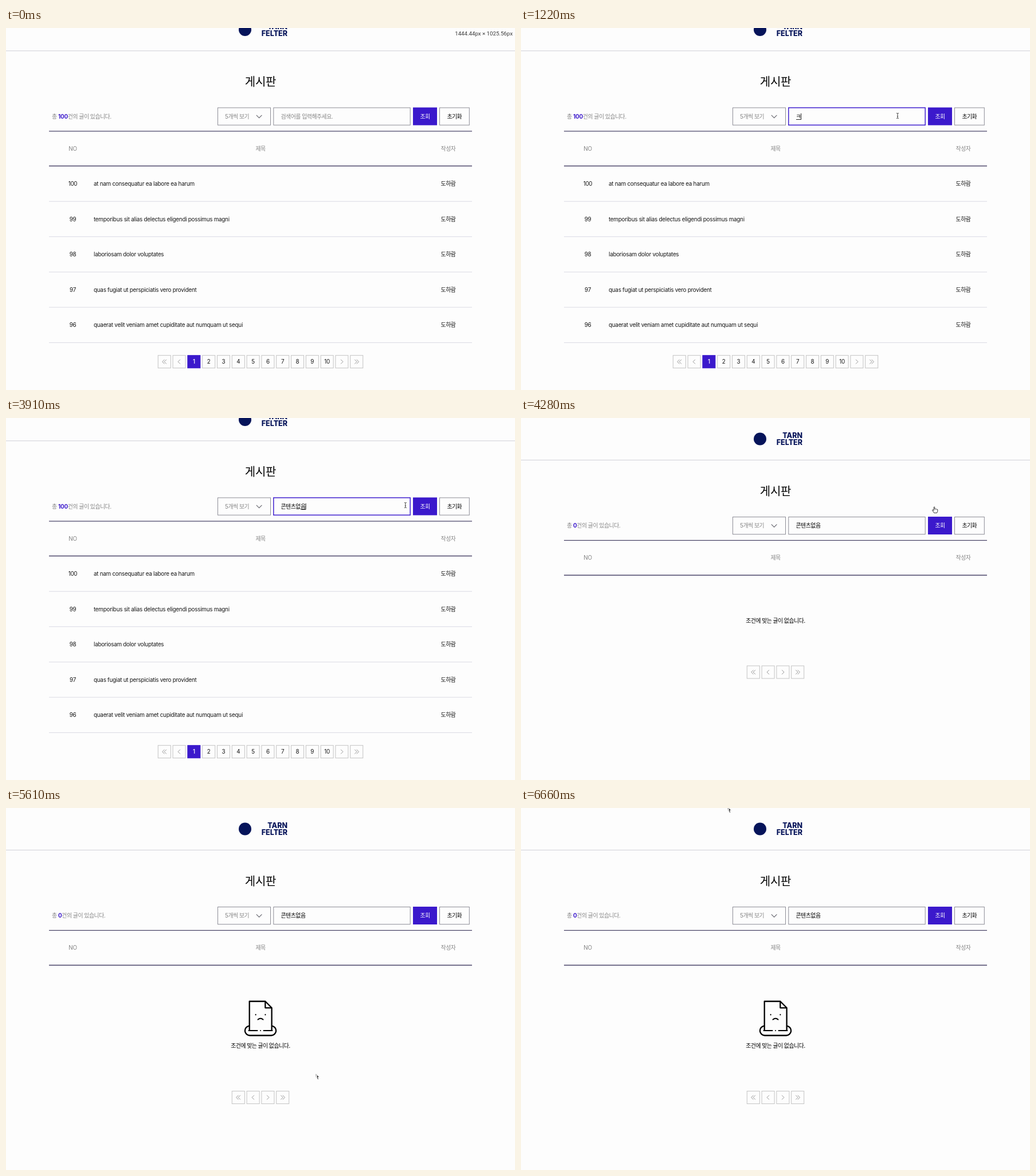
Recreate the animation shown at these times as an HTML page. Size 888x631 px, loop 6.69 s.

```html
<!DOCTYPE html>
<html lang="ko">
<head>
<meta charset="utf-8">
<title>게시판</title>
<style>
  html, body { margin: 0; width: 100%; height: 100%; overflow: hidden; background: #fdfdfd; }
  svg { display: block; width: 888px; height: 631px; }
  text { font: 400 9.85px Inter, "Noto Sans CJK KR", "Noto Sans CJK", sans-serif; letter-spacing: -.25px; fill: #161616; white-space: pre; }
  .ko { letter-spacing: -.46px; }
  .mid { text-anchor: middle; }
  .muted { fill: #858585; }
  .strong { font-weight: 500; fill: #000; }
  .white { fill: #fff; font-weight: 500; }
  .title { font-size: 20px; font-weight: 500; letter-spacing: -.3px; fill: #000; }
  .brand { font-size: 12.5px; font-weight: 800; letter-spacing: 0; text-anchor: end; fill: #06145a; }
  .tip { font: 9.7px Roboto, sans-serif; letter-spacing: 0; text-anchor: end; fill: #3a3a3a; }
  #count { font-weight: 700; fill: #3b19cc; letter-spacing: -.2px; }
</style>
</head>
<body>
<svg viewBox="0 0 888 631">
  <g id="page">
    <circle cx="417" cy="36.5" r="11" fill="#06145a"/>
    <text class="brand" x="491" y="35">TARN</text>
    <text class="brand" x="491" y="47">FELTER</text>
    <path d="M0 73.3H888" stroke="#d0d0d8"/>
    <text class="title mid" x="444" y="134.5">게시판</text>
    <text class="ko muted" x="80" y="191">총 <tspan id="count"></tspan>건의 글이 있습니다.</text>
    <g fill="none" stroke="#8d8d96">
      <rect x="369.5" y="172.5" width="92" height="30.2"/>
      <rect id="field" x="466.8" y="172.5" width="238.4" height="30.2"/>
      <rect x="756.5" y="172.5" width="51.8" height="30.2"/>
      <path d="M436.8 185.3l4.8 4.8 4.8-4.8" stroke="#66666e" stroke-width="1.1"/>
    </g>
    <rect x="710" y="172" width="42" height="31" fill="#3b19cc"/>
    <text class="ko muted" x="382" y="191">5개씩 보기</text>
    <text class="ko" id="query" x="479.5" y="191"></text>
    <path id="underline" stroke="#111" stroke-width=".9"/>
    <path id="caret" stroke="#000" stroke-width=".9"/>
    <text class="ko mid white" x="731" y="191">조회</text>
    <text class="ko mid strong" x="782.3" y="191">초기화</text>
    <path d="M75 213.4H813M75 274H813" stroke="#4b4669" stroke-width="1.3"/>
    <text class="mid muted" x="116.5" y="247.2">NO</text>
    <text class="ko mid muted" x="444" y="247.2">제목</text>
    <text class="ko mid muted" x="771.5" y="247.2">작성자</text>
    <g id="list"></g>
    <g id="empty">
      <g id="icon" fill="none" stroke="#000" stroke-width="2.3" stroke-linecap="round" stroke-linejoin="round">
        <path d="M424.7 387V337H452.3L463.6 348.3V387M452.3 337V348.3H463.6"/>
        <path d="M424 379.8a8.4 8.4 0 0 0 1.6 16.7H462.4a8.4 8.4 0 0 0 1.6-16.7"/>
        <path d="M423.5 388H438.5M444 388h.01M449.5 388H464.5M435.6 360v.5M452.4 360v.5" stroke-width="2"/>
        <path d="M439.5 368.8Q444 364.6 448.5 368.8" stroke-width="2"/>
      </g>
      <g id="message"><text class="ko mid strong" x="444" y="356.8">조건에 맞는 글이 없습니다.</text></g>
    </g>
  </g>
  <text class="tip" id="tip" x="884" y="12.5">1444.44px × 1025.56px</text>
  <g id="cursor">
    <path id="beam" d="M-2-4.6Q0-4.6 0-3.4Q0-4.6 2-4.6M0-3.4V3.4M-2 4.6Q0 4.6 0 3.4Q0 4.6 2 4.6M-1 1H1" fill="none" stroke="#333" stroke-width=".9"/>
    <path id="arrow" d="M0 0V8.6L2-.1L2 6.8L3.5 10.2L5 9.5L3.5 6.2H6.2Z" fill="#111" stroke="#fff" stroke-width=".7"/>
    <path id="hand" d="M-1.8-4.6q1-1.2 1.7 0V-1q1.2-1 1.8 0q1.1-.8 1.6.2q1.3-.6 1.5.8V2.4L3.6 5.4H-1.4L-4.2 1.2q-.4-1.6 1-1.2l1.4 1.3Z" fill="#fff" stroke="#222" stroke-width=".9" stroke-linejoin="round"/>
  </g>
</svg>
<script>
const LOOP = 6690, SCROLL = 33.5, ROW = 61.55, CELL = 25.8, CHAR = 8.6;
const RESULT = 4280, ICON = 4360, FOCUS = 880, BLUR = 4150, HIDE_TIP = 1160;
const el = id => document.getElementById(id);
const show = (id, on) => el(id).setAttribute('visibility', on ? 'inherit' : 'hidden');
const move = (id, x, y) => el(id).setAttribute('transform', `translate(${x} ${y})`);
const label = (cls, x, y, text) => `<text class="${cls}" x="${x}" y="${y}">${text}</text>`;

const titles = [
  'at nam consequatur ea labore ea harum',
  'temporibus sit alias delectus eligendi possimus magni',
  'laboriosam dolor voluptates',
  'quas fugiat ut perspiciatis vero provident',
  'quaerat velit veniam amet cupiditate aut numquam ut sequi'
];
const rows = titles.map((title, i) => {
  const y = 308.5 + ROW * i;
  return label('mid', 116.5, y, 100 - i) + label('', 153, y, title) + label('ko mid', 771.5, y, '도하람') +
    `<path d="M75 ${335.7 + ROW * i}H813" stroke="#dadae4"/>`;
}).join('');

function pager(y, pages) {
  const chevron = (x, dir) => `M${x - dir * 1.8} ${y - 3.8}l${dir * 3.8} 3.8l${-dir * 3.8} 3.8`;
  const arrows = { '«': [-1, 2], '‹': [-1, 1], '›': [1, 1], '»': [1, 2] };
  const cells = ['«', '‹', ...pages, '›', '»'];
  return cells.map((cell, i) => {
    const x = 444 + CELL * (i - (cells.length - 1) / 2), active = cell === 1;
    const box = `<rect x="${x - 11}" y="${y - 11}" width="22" height="22" fill="${active ? '#3b19cc' : 'none'}" stroke="${active ? '#3b19cc' : '#c4c4c4'}"/>`;
    if (!arrows[cell]) return box + label(active ? 'mid white' : 'mid', x, y + 3.6, cell);
    const [dir, count] = arrows[cell];
    const d = count === 1 ? chevron(x, dir) : chevron(x - 1.6, dir) + chevron(x + 1.8, dir);
    return box + `<path d="${d}" fill="none" stroke="#8c8c8c" stroke-width=".9"/>`;
  }).join('');
}
el('list').innerHTML = rows + pager(615.2, [1, 2, 3, 4, 5, 6, 7, 8, 9, 10]);
el('message').innerHTML += pager(443, []);

const typing = [
  [1220, 'ㅋ'], [1680, '코'], [1730, '콘'], [1990, '콘ㅌ'], [2080, '콘테'], [2180, '콘텐'],
  [2280, '콘텐ㅊ'], [2380, '콘텐츠'], [2650, '콘텐츠ㅇ'], [2720, '콘텐츠어'], [2790, '콘텐츠업'],
  [2860, '콘텐츠없'], [3000, '콘텐츠없ㅇ'], [3130, '콘텐츠없으'], [3220, '콘텐츠없음']
];

// Pointer path: time, x, y
const path = [
  [140, 887, 330], [300, 800, 240], [440, 702, 172], [570, 668, 157], [790, 657, 153],
  [3590, 657, 153], [3850, 690, 150], [4100, 718, 158], [4250, 722, 160],
  [4570, 722, 160], [4800, 706, 188], [5000, 655, 225], [5200, 612, 262],
  [5240, 612, 270], [5420, 620, 400], [5610, 541.5, 463], [5740, 390, 455], [5880, 250, 400],
  [6170, 250, 400], [6330, 290, 260], [6500, 335, 90], [6660, 360.5, -2]
];
function pointAt(t) {
  const i = path.findIndex(p => p[0] > t);
  if (i < 1) return path[i ? path.length - 1 : 0].slice(1);
  const [t0, x0, y0] = path[i - 1], [t1, x1, y1] = path[i], k = (t - t0) / (t1 - t0);
  return [x0 + (x1 - x0) * k, y0 + (y1 - y0) * k];
}
function pointerKind(t, x, y) {
  if (t < 140 || (t >= 2930 && t < 3590)) return '';
  if (t >= RESULT && t < 4570) return 'hand';
  const top = t < RESULT ? 139 : 172;
  if (y < top || y > top + 31) return 'arrow';
  if (x > 466 && x < 706) return 'beam';
  return x > 710 && x < 808 ? 'hand' : 'arrow';
}

function draw(now) {
  const t = now % LOOP, done = t >= RESULT, focused = t >= FOCUS && t < BLUR;
  move('page', 0, done ? 0 : -SCROLL);
  el('count').textContent = done ? '0' : '100';
  show('list', !done);
  show('empty', done);
  show('icon', t >= ICON);
  move('message', 0, t >= ICON ? 61.5 : 0);
  show('tip', t < HIDE_TIP);

  const typed = typing.reduce((text, [at, next]) => t >= at ? next : text, '');
  const end = 480 + CHAR * typed.length;
  el('query').textContent = typed || '검색어를 입력해주세요.';
  el('query').setAttribute('class', typed ? 'ko strong' : 'ko muted');
  el('caret').setAttribute('d', `M${end} 182.3V193`);
  el('underline').setAttribute('d', `M${end - CHAR} 193H${end}`);
  show('caret', focused);
  show('underline', focused && typed);
  el('field').setAttribute('stroke', focused ? '#4122cf' : '#8d8d96');
  el('field').setAttribute('stroke-width', focused ? 1.5 : 1);

  const [x, y] = pointAt(t), kind = pointerKind(t, x, y);
  move('cursor', x, y);
  for (const id of ['beam', 'arrow', 'hand']) show(id, id === kind);
  requestAnimationFrame(() => draw(performance.now()));
}
draw(performance.now());
</script>
</body>
</html>
```
